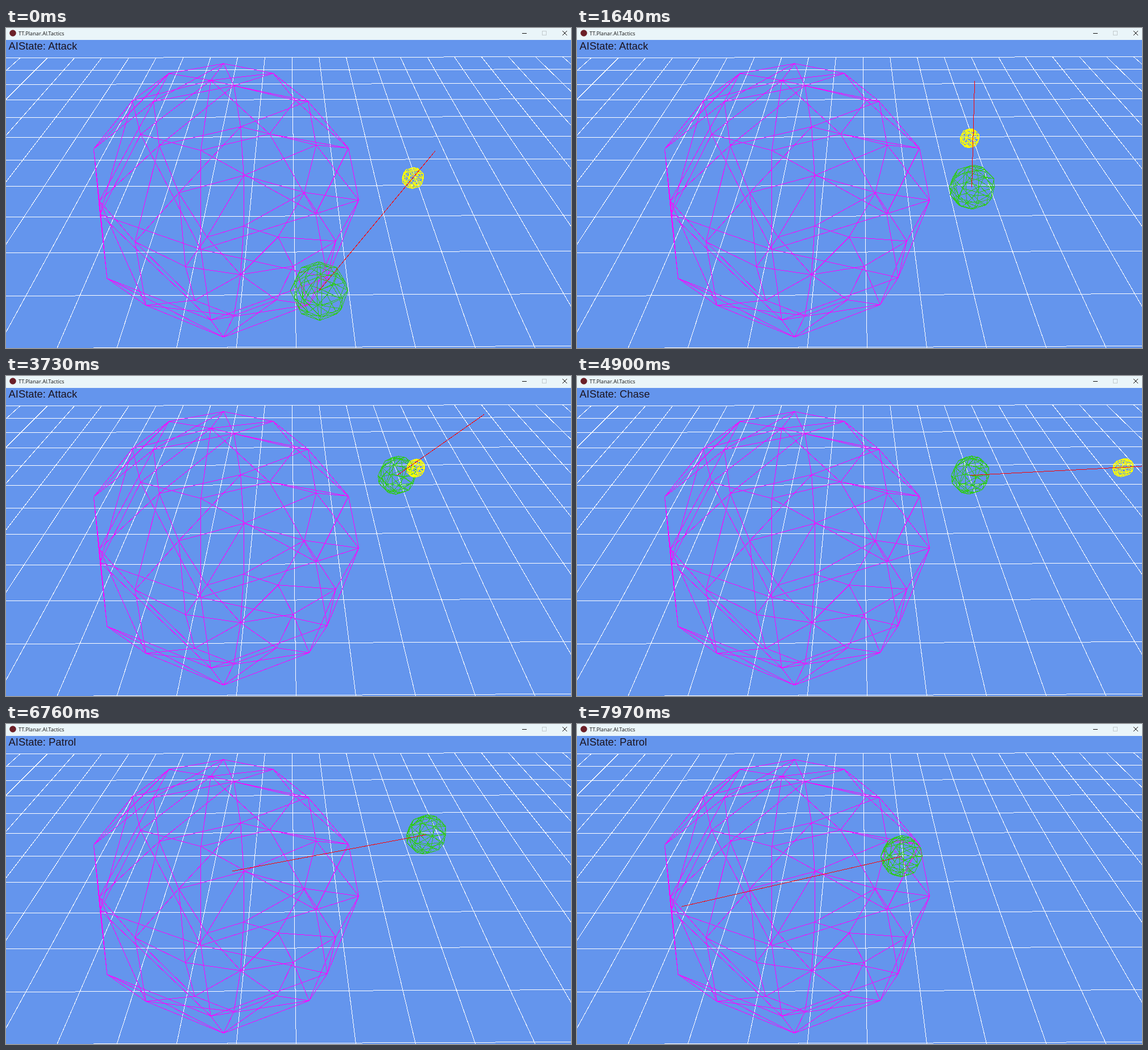
Write an HTML page that moves like this. It is 994 px wide and 563 px high and loops after 8 s.

```html
<!DOCTYPE html>
<html lang="en">
<head>
<meta charset="utf-8">
<title>AI states</title>
<style>
  html, body { margin: 0; width: 100%; height: 100%; overflow: hidden; background: #6495ed; }
  svg { display: block; width: 100%; height: 100%; }
  .wire path { fill: none; shape-rendering: crispEdges; }
  .title { font: 9.2px "Open Sans", sans-serif; fill: #111; }
  .state { font: 18.4px "Liberation Sans", Arial, sans-serif; fill: #1b1420; }
</style>
</head>
<body>
<svg viewBox="0 0 994 563">
  <rect width="994" height="563" fill="#6495ed"/>
  <g class="wire">
    <path id="grid" stroke="#fff"/>
    <path id="zone" stroke="#f0f"/>
    <path id="agent" stroke="#2fc81f"/>
    <path id="player" stroke="#ff0"/>
    <path id="ray" stroke="#f00"/>
  </g>
  <text id="state" class="state" x="4.5" y="38"></text>
  <rect width="994" height="21" fill="#eaf5f9"/>
  <circle cx="12" cy="9" r="5.8" fill="#6b2028"/>
  <text class="title" x="22" y="12.5">TT.Planar.AI.Tactics</text>
  <g fill="none" stroke="#111">
    <path d="M908 9.5h8"/>
    <rect x="943.5" y="5.5" width="7" height="7" stroke="#c3cbce"/>
    <path d="M979 5l8 8M987 5l-8 8"/>
  </g>
</svg>
<script>
const LOOP = 8000;
const RAY = 1.8;          // length of the heading ray
const SPEED = 0.00107;    // chase speed, units per ms
const LAG = 60;           // delay before the agent turns to the player
const PATROL_TIME = 2070;

const $ = id => document.getElementById(id);
const mix = (a, b, u) => a + (b - a) * u;

// World space is centred on the big sphere, whose radius is 1.
function project(x, y, z) {
  const w = 1 + 0.001 * x - 0.237 * (y + z);
  return [
    497 + (228 * x - 104.3) / w,
    298 + (5.5 - 0.7 * x - 162.7 * y + 159.1 * z) / w
  ];
}

const fmt = p => p[0].toFixed(1) + ' ' + p[1].toFixed(1);
const segment = (a, b) => 'M' + fmt(a) + 'L' + fmt(b);

// Triangulated sphere: six bands of eight slices.
function sphere(cx, cz, r) {
  const at = (i, j) => {
    const lat = Math.PI / 2 - i * Math.PI / 6;
    const lon = j * Math.PI / 4;
    const c = r * Math.cos(lat);
    return project(cx + c * Math.sin(lon), r * Math.sin(lat), cz + c * Math.cos(lon));
  };
  let d = '';
  for (let i = 0; i < 6; i++) {
    for (let j = 0; j < 8; j++) {
      const p = at(i, j);
      d += segment(p, at(i + 1, j));
      if (i > 0) d += segment(p, at(i, j + 1));
      if (i > 0 && i < 5) d += segment(p, at(i + 1, j + 1));
    }
  }
  return d;
}

// Ground lines every third of a unit.
function grid() {
  const far = -2.5, near = 1.5, side = 4.5;
  let d = '';
  for (let k = 0; k <= 12; k++) {
    const z = far + k / 3;
    d += segment(project(-side, 0, z), project(side, 0, z));
  }
  for (let k = 0; k <= 27; k++) {
    const x = -side + k / 3;
    d += segment(project(x, 0, far), project(x, 0, near));
  }
  return d;
}

// The agent leaves each stop at its departure time; the last leg is the patrol.
const stops = [[0.649, 0.803], [1.355, -0.145], [1.49, -0.982], [2.587, -1.1], [0.819, -0.486]];
const departs = [40, 2640, 4880, 5900];

function agentAt(t) {
  const leg = departs.filter(d => d <= t).length - 1;
  if (leg < 0) return { x: stops[0][0], z: stops[0][1], state: 'Attack' };
  const [a, b] = [stops[leg], stops[leg + 1]];
  const age = t - departs[leg];
  const patrol = leg === departs.length - 1;
  const u = patrol
    ? 1 - Math.max(0, 1 - age / PATROL_TIME) ** 1.25
    : Math.min(1, age * SPEED / Math.hypot(b[0] - a[0], b[1] - a[1]));
  return {
    x: mix(a[0], b[0], u),
    z: mix(a[1], b[1], u),
    state: patrol ? 'Patrol' : u < 1 ? 'Chase' : 'Attack'
  };
}

// Player key points: time, x, z. The last leg runs on off stage.
const route = [
  [0, 1.476, -0.255], [840, 1.9, -0.78], [1640, 1.471, -0.807], [1910, 1.45, -1],
  [2600, 1.45, -1], [3450, 1.5, -1.29], [3730, 1.697, -1.106], [4900, 3.03, -1.109]
];

function playerAt(t) {
  let i = 0;
  while (i < route.length - 2 && route[i + 1][0] <= t) i++;
  const [a, b] = [route[i], route[i + 1]];
  const u = (t - a[0]) / (b[0] - a[0]);
  return { x: mix(a[1], b[1], u), z: mix(a[2], b[2], u) };
}

// Chasing looks at the player; patrolling sways around a fixed course.
function headingAt(t, agent) {
  if (agent.state === 'Patrol') {
    const sway = Math.cos((t - 6300) / 1000 * 2 * Math.PI);
    return (202 + 6 * sway) * Math.PI / 180;
  }
  const seen = playerAt(t - LAG);
  return Math.atan2(agent.z - seen.z, seen.x - agent.x);
}

function draw(t) {
  const agent = agentAt(t);
  const player = playerAt(t);
  const a = headingAt(t, agent);
  const tip = project(agent.x + RAY * Math.cos(a), 0, agent.z - RAY * Math.sin(a));

  $('state').textContent = 'AIState: ' + agent.state;
  $('agent').setAttribute('d', sphere(agent.x, agent.z, 0.18));
  $('player').setAttribute('d', agent.state === 'Patrol' ? '' : sphere(player.x, player.z, 0.088));
  $('ray').setAttribute('d', segment(project(agent.x, 0, agent.z), tip));
}

$('grid').setAttribute('d', grid());
$('zone').setAttribute('d', sphere(0, 0, 1));

const start = performance.now();
function frame() {
  draw((performance.now() - start) % LOOP);
  requestAnimationFrame(frame);
}
frame();
</script>
</body>
</html>
```
